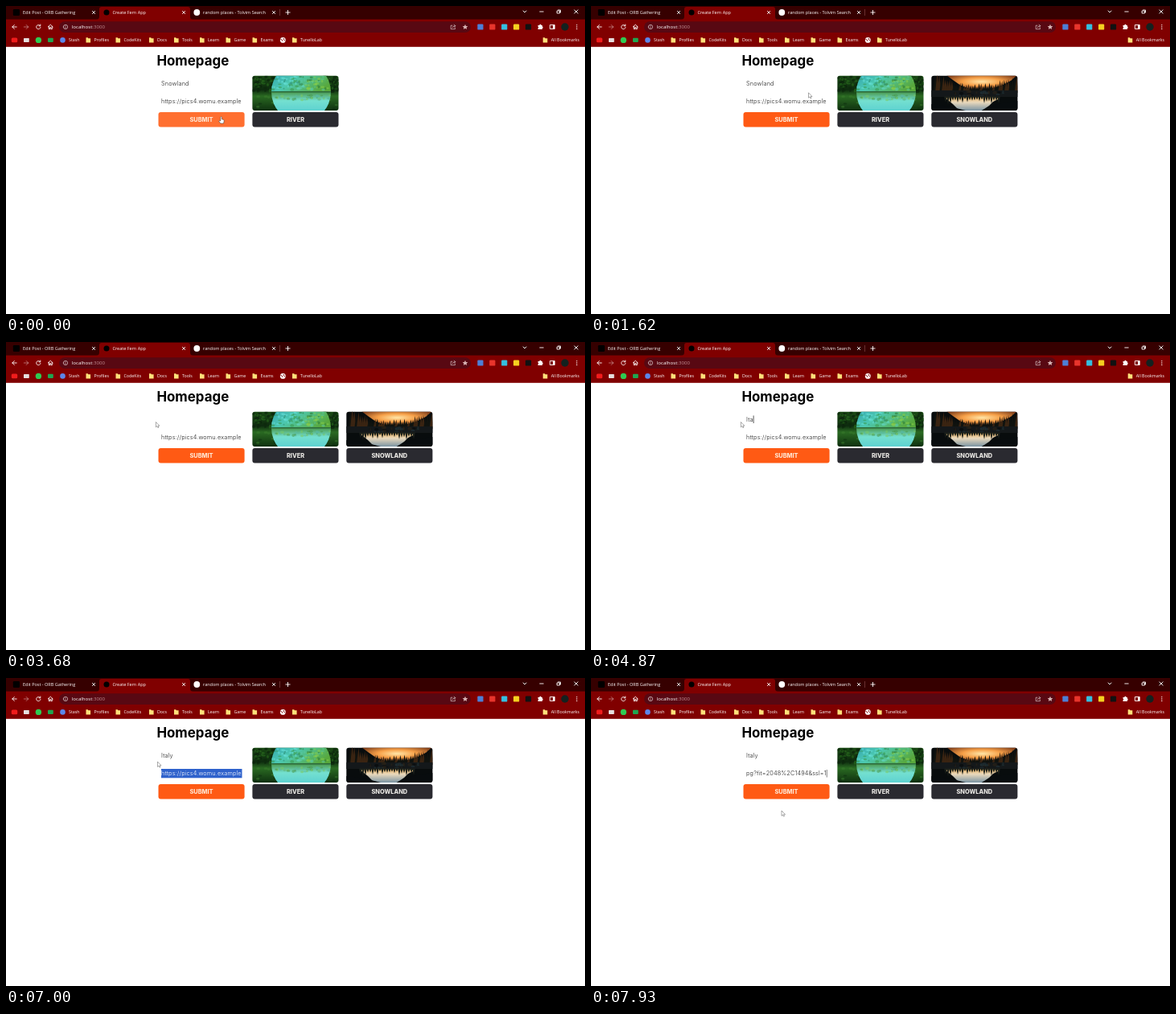
An HTML page that plays this animation: 720x383 px, repeating every 8000 ms.

```html
<!DOCTYPE html>
<html lang="en">
<head>
<meta charset="utf-8">
<title>Homepage</title>
<style>
  html, body { margin: 0; width: 100%; height: 100%; overflow: hidden; background: #fff; }
  svg { display: block; width: 100%; height: 100%; }
  text { white-space: pre; }
  .ui { font-family: "Open Sans", "Noto Sans", sans-serif; font-weight: 500; fill: #fff; }
  .page { font-family: Inter, sans-serif; font-size: 7.3px; fill: #222; }
  .field { font-weight: 300; letter-spacing: .15px; }
  .btn { font-size: 7.4px; font-weight: 800; fill: #e8e6e2; text-anchor: middle; }
  .line { fill: none; stroke: #fff; stroke-width: .9; stroke-linecap: round; stroke-linejoin: round; }
</style>
</head>
<body>
<svg id="stage" viewBox="0 0 720 383" xmlns="http://www.w3.org/2000/svg">
  <defs>
    <clipPath id="fields"><rect x="192.8" y="86" width="100.9" height="42"/></clipPath>
    <clipPath id="nameClip"><rect id="nameCut" y="90.5" height="11.3"/></clipPath>
    <clipPath id="cardA"><rect x="306.4" y="86.8" width="107.1" height="43.1" rx="3"/></clipPath>
    <clipPath id="cardB"><rect x="423.3" y="86.8" width="107.1" height="43.1" rx="3"/></clipPath>
    <clipPath id="disc"><circle cx="367" cy="107" r="37"/></clipPath>
    <linearGradient id="woods" x2="0" y2="1">
      <stop offset="0" stop-color="#1c4d16"/><stop offset=".4" stop-color="#0d2a0e"/>
      <stop offset=".58" stop-color="#2a6a22"/><stop offset="1" stop-color="#0d2d0e"/>
    </linearGradient>
    <linearGradient id="canopy" x2="1" y2=".4">
      <stop offset="0" stop-color="#35a8b4"/><stop offset=".4" stop-color="#4cc8b0"/>
      <stop offset="1" stop-color="#58a83c"/>
    </linearGradient>
    <linearGradient id="lake" x2="0" y2="1">
      <stop offset="0" stop-color="#4a9a50"/><stop offset=".45" stop-color="#74e0d0"/>
      <stop offset="1" stop-color="#5cd0d0"/>
    </linearGradient>
    <radialGradient id="dusk" cx=".5" cy=".45" r=".6">
      <stop offset="0" stop-color="#ffe6a8"/><stop offset=".45" stop-color="#f7a048"/>
      <stop offset="1" stop-color="#7a3a18"/>
    </radialGradient>
    <linearGradient id="mirror" x2="0" y2="1">
      <stop offset="0" stop-color="#f2b866"/><stop offset=".4" stop-color="#e8d8bc"/>
      <stop offset="1" stop-color="#7a93a2"/>
    </linearGradient>
  </defs>
  <g id="chrome" class="ui"></g>
  <g class="page">
    <text x="187.4" y="74" font-size="16.9" font-weight="700" fill="#000">Homepage</text>
    <g class="field" clip-path="url(#fields)">
      <text id="name" x="193" y="98.8"></text>
      <rect id="nameSel" y="90.5" height="11.3" fill="#3a70dc"/>
      <g clip-path="url(#nameClip)"><text x="193" y="98.8" fill="#fff">Snowland</text></g>
      <rect id="linkSel" x="193" y="113" width="100.7" height="11.3" fill="#2f62cc"/>
      <text id="link" y="121.3"></text>
      <rect id="caret" width=".7" height="9.5" fill="#111"/>
    </g>
    <rect id="submit" x="189.5" y="132" width="107.1" height="18.5" rx="3"/>
    <text class="btn" x="243" y="144" style="fill:#ffe3cf">SUBMIT</text>
    <g id="river"></g>
    <rect x="306.4" y="132" width="107.1" height="18.5" rx="3" fill="#2a2a30"/>
    <text class="btn" x="360" y="144">RIVER</text>
    <g id="newCard">
      <rect x="423.3" y="132" width="107.1" height="18.5" rx="3" fill="#2a2a30"/>
      <text class="btn" x="476.8" y="144">SNOWLAND</text>
    </g>
    <rect id="blank" x="423.3" y="86.8" width="107.1" height="43.1" rx="2" fill="#f2fffe"/>
    <g id="sunset"></g>
  </g>
  <g id="cursor">
    <path id="arrow" d="M0 0V6.4L1.5 5.1 2.5 7.2 3.5 6.7 2.6 4.7H4.5Z" fill="#fff" stroke="#555" stroke-width=".5"/>
    <path id="beam" d="M-1.3-4H1.3M0-4V4M-1.3 4H1.3" fill="none" stroke="#444" stroke-width=".6"/>
    <path id="hand" d="M-.8.6Q0-.6.8.6V3.2L3 3.8Q3.8 4.1 3.6 5L3 8.4H-.9L-3 5.4Q-2.8 4.2-.8 5.4Z" fill="#fff" stroke="#333" stroke-width=".5"/>
  </g>
</svg>
<script>
const $ = id => document.getElementById(id);
const show = (id, on) => $(id).setAttribute('display', on ? 'inline' : 'none');
const set = (id, attrs) => { for (const k in attrs) $(id).setAttribute(k, attrs[k]); };

// --- browser frame ---
const rect = (x, y, w, h, fill, r = 0) =>
  `<rect x="${x}" y="${y}" width="${w}" height="${h}" rx="${r}" fill="${fill}"/>`;
const dot = (x, y, r, fill) => `<circle cx="${x}" cy="${y}" r="${r}" fill="${fill}"/>`;
const line = (x, y, d, extra = '') => `<path class="line" transform="translate(${x} ${y})" d="${d}" ${extra}/>`;
const label = (x, y, size, s) => `<text x="${x}" y="${y}" font-size="${size}">${s}</text>`;
const cross = (x, y, r) => line(x, y, `M${-r} ${-r}L${r} ${r}M${r} ${-r}L${-r} ${r}`);
const folder = x => `<path d="M${x - 2.8} 39.3h2.2l.8.9h2.6v5.2h-5.6z" fill="#ffe07a"/>`;

function drawChrome() {
  let s = rect(0, 0, 720, 18, '#360000') + rect(0, 16.6, 720, 34.2, '#800000') +
    '<path d="M112 17Q116 17 116 13V4Q116 1 119 1H226Q229 1 229 4V13Q229 17 233 17Z" fill="#800000"/>' +
    rect(66, 19.2, 512, 13.8, '#580812', 6.9);

  // tabs
  s += rect(8.8, 4, 8.2, 8, '#000', 1.2) + dot(125, 8, 3.5, '#000') + dot(237.3, 8, 3.9, '#fff');
  s += label(21, 10, 5.5, 'Edit Post - ORB Gathering') + label(132.5, 10, 5.5, 'Create Fern App') +
    label(245, 10, 5.5, 'random places - Tolvim Search');
  s += [109, 221, 333].map(x => cross(x, 8, 1.6)).join('');
  s += rect(340, 4, .6, 8, '#8a5050') + line(350.5, 8, 'M-2.6 0H2.6M0-2.6V2.6');
  s += line(645, 7, 'M-2-1L0 1 2-1') + line(666, 7, 'M-2.2 0H2.2') +
    line(687.5, 7, 'M-2-1H1V2H-2ZM-1-2H2V1') + cross(709, 7, 2.1);

  // toolbar
  s += line(10.5, 26, 'M2.7 0H-2.7M-.2-2.5L-2.7 0-.2 2.5') +
    line(25, 26, 'M-2.7 0H2.7M.2-2.5L2.7 0 .2 2.5', 'opacity=".45"') +
    line(40.3, 26, 'M2 -1.6A2.6 2.6 0 1 0 2.6 .6M2.5-3V-1.2H.7') +
    line(55.3, 26, 'M-3 0L0-2.8 3 0M-2-.6V2.7H-.6V.6H.6V2.7H2V-.6');
  s += line(74, 26, 'M-2.7 0A2.7 2.7 0 1 0 2.7 0A2.7 2.7 0 1 0-2.7 0M0-.2V1.4M0-1.4V-1.3', 'opacity=".6"');
  s += label(81.8, 28.2, 6.1, 'localhost<tspan fill="#c08c92">:3000</tspan>');
  s += line(556, 26, 'M-1-1.8H-2.8V2.7H2.4V1M-1 .8Q-.6-1.3 2.8-1.3M1.2-2.9L2.8-1.3 1.2.2', 'opacity=".6"') +
    '<path transform="translate(571 26)" d="M0-3.3L1 -1.1 3.3-.9 1.6.7 2.1 3 0 1.8-2.1 3-1.6.7-3.3-.9-1-1.1Z" fill="#d8b4b4"/>';
  s += ['#4d7fd6', '#e8352c', '#35bfe0', '#f5d020', '#111'].map((c, i) =>
    rect(586.3 + i * 14.9, 22.4, 7.2, 7.2, c, 1.2)).join('');
  s += '<path transform="translate(664.5 26)" d="M-3-2H-1.2A1.2 1.2 0 0 1 1.2-2H2.4V-.6A1.2 1.2 0 0 1 2.4 1.7V3H-3V1.5A1.1 1.1 0 0 0-3-.6Z" fill="#fff"/>';
  s += line(679.5, 26, 'M-2.7-2.5H2.7V2.5H-2.7Z') + rect(680, 23.5, 2.3, 5, '#fff') + dot(695, 26, 4.7, '#14211f');
  s += [23.6, 26, 28.4].map(y => dot(709.8, y, .7, '#fff')).join('');

  // bookmarks
  s += rect(6.8, 39.6, 7.4, 5.6, '#f01c1c', 1.5) + rect(22, 39.9, 6.8, 5, '#e6dede', .6) +
    dot(40.4, 42.4, 3.7, '#2fcb52') + rect(52, 39.8, 6.8, 5.2, '#1fa650', 1) + dot(70.5, 42.4, 3.3, '#5c86ea');
  const marks = [[78, 'Stash'], [109.5, 'Profiles'], [146.5, 'CodeKits'], [188, 'Docs'], [219, 'Tools'],
    [251, 'Learn'], [283.5, 'Game'], [316.5, 'Exams'], [366, 'TunelloLab'], [677.7, 'All Bookmarks']];
  s += marks.map(([x, t], i) => (i ? folder(x - 7.2) : '') + label(x, 44.4, 5.3, t)).join('');
  s += dot(344.3, 42.4, 3.4, '#fff') + line(344.3, 42.4, 'M-2.5-1Q-.5-.8-.3 1M1-2Q.2-.4 2.4.8', 'style="stroke:#800000"');
  $('chrome').innerHTML = s;
}

// --- pictures ---
function seeded(n) {
  return () => (n = (n * 16807) % 2147483647) / 2147483647;
}

function blobs(count, rnd, x, y, w, h, colors, size) {
  let s = '';
  for (let i = 0; i < count; i++) {
    const c = colors[Math.floor(rnd() * colors.length)];
    s += `<ellipse cx="${(x + rnd() * w).toFixed(1)}" cy="${(y + rnd() * h).toFixed(1)}" rx="${(size * (.5 + rnd())).toFixed(1)}" ry="${(size * (.4 + rnd() * .7)).toFixed(1)}" fill="${c}" opacity=".55"/>`;
  }
  return s;
}

function drawRiver() {
  const rnd = seeded(71), leaves = ['#081c0a', '#123c12', '#2c7420', '#0c260c'];
  let s = rect(306, 86, 108, 45, 'url(#woods)') +
    blobs(60, rnd, 306, 87, 30, 20, leaves, 2) + blobs(60, rnd, 390, 87, 24, 20, leaves, 2) +
    blobs(24, rnd, 306, 110, 108, 20, ['#0b2c10', '#3a7a2c'], 2);
  s += '<g clip-path="url(#disc)">' + rect(330, 86, 76, 22, 'url(#canopy)') + rect(330, 107, 76, 24, 'url(#lake)') +
    blobs(50, rnd, 330, 88, 40, 16, ['#2c8a70', '#66e0d8', '#3a9a4c'], 1.8) +
    blobs(50, rnd, 366, 88, 40, 16, ['#2c7a34', '#8ad04c', '#5cc8a0'], 1.8) +
    blobs(40, rnd, 330, 111, 76, 6, ['#4a9a4c', '#7ac860', '#58b8a0'], 1.8) +
    rect(330, 106, 76, 1.5, '#2c6a3c') + '</g>';
  $('river').innerHTML = `<g clip-path="url(#cardA)">${s}</g>`;
}

function drawSunset() {
  const rnd = seeded(29);
  let s = rect(423, 86, 108, 45, '#080c0d') +
    '<path d="M442 86H530L522 93 510 99 494 104 474 104 460 99 450 92Z" fill="url(#dusk)"/>';
  for (let x = 428; x < 530; x += 2.6) {
    const side = Math.abs(x - 482) / 48;
    const top = 101 - side * side * 13 - rnd() * 5;
    s += `<path d="M${x - 2.6} 108L${x} ${top.toFixed(1)} ${x + 2.6} 108Z" fill="${rnd() < .4 ? '#3a2412' : '#10130f'}"/>`;
  }
  s += rect(423, 105, 108, 8, '#14181a') + blobs(30, rnd, 445, 106, 70, 6, ['#2c2416', '#22343a', '#080c0d'], 2) +
    '<path d="M440 114L456 113H500L508 115 500 119 495 124 486 130H458L450 122Z" fill="url(#mirror)"/>';
  for (let x = 441; x < 508; x += 3) {
    const side = Math.abs(x - 474) / 34;
    s += `<path d="M${x - 1.8} 112.5H${x + 1.8}L${x} ${(114 + side * 5 + rnd() * 5).toFixed(1)}Z" fill="#1c211b"/>`;
  }
  s += '<path d="M423 122Q446 124 462 129L470 131H423ZM531 118Q500 121 484 131H531Z" fill="#080c0e"/>';
  $('sunset').innerHTML = `<g clip-path="url(#cardB)">${s}</g>`;
}

// --- timeline: every list holds [time, value...] ---
const LOOP = 8000;
const glide = (t0, t1, n, [x0, y0], [x1, y1]) => Array.from({ length: n }, (_, i) => {
  const k = (i + 1) / n, e = k * k * (3 - 2 * k);
  return [t0 + (t1 - t0) * i / (n - 1), x0 + (x1 - x0) * e, y0 + (y1 - y0) * e];
});
const pointer = [
  [0, 267.6, 137.6], [1060, 304, 115], [1180, 285, 110.5], [1250, 274, 109], [1620, 270.5, 107.8],
  ...glide(2000, 2250, 4, [270.5, 107.8], [214, 96]),
  [2430, 196, 97], [2620, 190, 99], [2680, 186.4, 99.5],
  ...glide(7000, 7500, 8, [186.4, 99.5], [236, 206]),
  ...glide(7680, 7930, 5, [236, 206], [237, 165])
];
const typed = [[0, 'Snowland'], [3180, ''], [4370, 'I'], [4680, 'It'], [4870, 'Ita'], [5250, 'Ital'], [5350, 'Italy']];
const picked = [[0, 0], [2250, 214], [2430, 193], [3180, 0]];
const focus = [[0, ''], [3180, 'name'], [3680, ''], [4370, 'name'], [5620, ''], [7680, 'link']];
const at = (list, t) => list.reduce((hit, item) => item[0] <= t ? item : hit);
const inside = (x, y, x0, y0, x1, y1) => x > x0 && x < x1 && y > y0 && y < y1;

function render(t) {
  const [, x, y] = at(pointer, t);
  const hover = inside(x, y, 189.5, 132, 296.6, 150.5);
  const overText = inside(x, y, 191, 88, 296, 104) || inside(x, y, 191, 111, 296, 127);
  set('cursor', { transform: `translate(${x} ${y})` });
  show('hand', hover);
  show('beam', overText);
  show('arrow', !hover && !overText);
  set('submit', { fill: hover ? '#ff6f30' : '#ff5a14' });

  $('name').textContent = at(typed, t)[1];
  const from = at(picked, t)[1];
  for (const id of ['nameSel', 'nameCut']) set(id, { x: from, width: from ? 228 - from : 0 });

  const pasted = t >= 7680, marked = t >= 5620 && !pasted;
  $('link').textContent = pasted ? 'pg?fit=2048%2C1494&ssl=1' : 'https://pics4.womu.example';
  set('link', { x: pasted ? 292.8 : 193, 'text-anchor': pasted ? 'end' : 'start', fill: marked ? '#fff' : '#222' });
  show('linkSel', marked);

  const where = at(focus, t)[1];
  show('caret', where);
  if (where === 'name') set('caret', { x: 193 + $('name').getComputedTextLength(), y: 91.5 });
  if (where === 'link') set('caret', { x: 292.9, y: 114 });

  show('newCard', t >= 430);
  show('blank', t >= 1060 && t < 1180);
  show('sunset', t >= 1180);
}

drawChrome();
drawRiver();
drawSunset();
const start = performance.now();
function tick() {
  render((performance.now() - start) % LOOP);
  requestAnimationFrame(tick);
}
tick();
</script>
</body>
</html>
```
